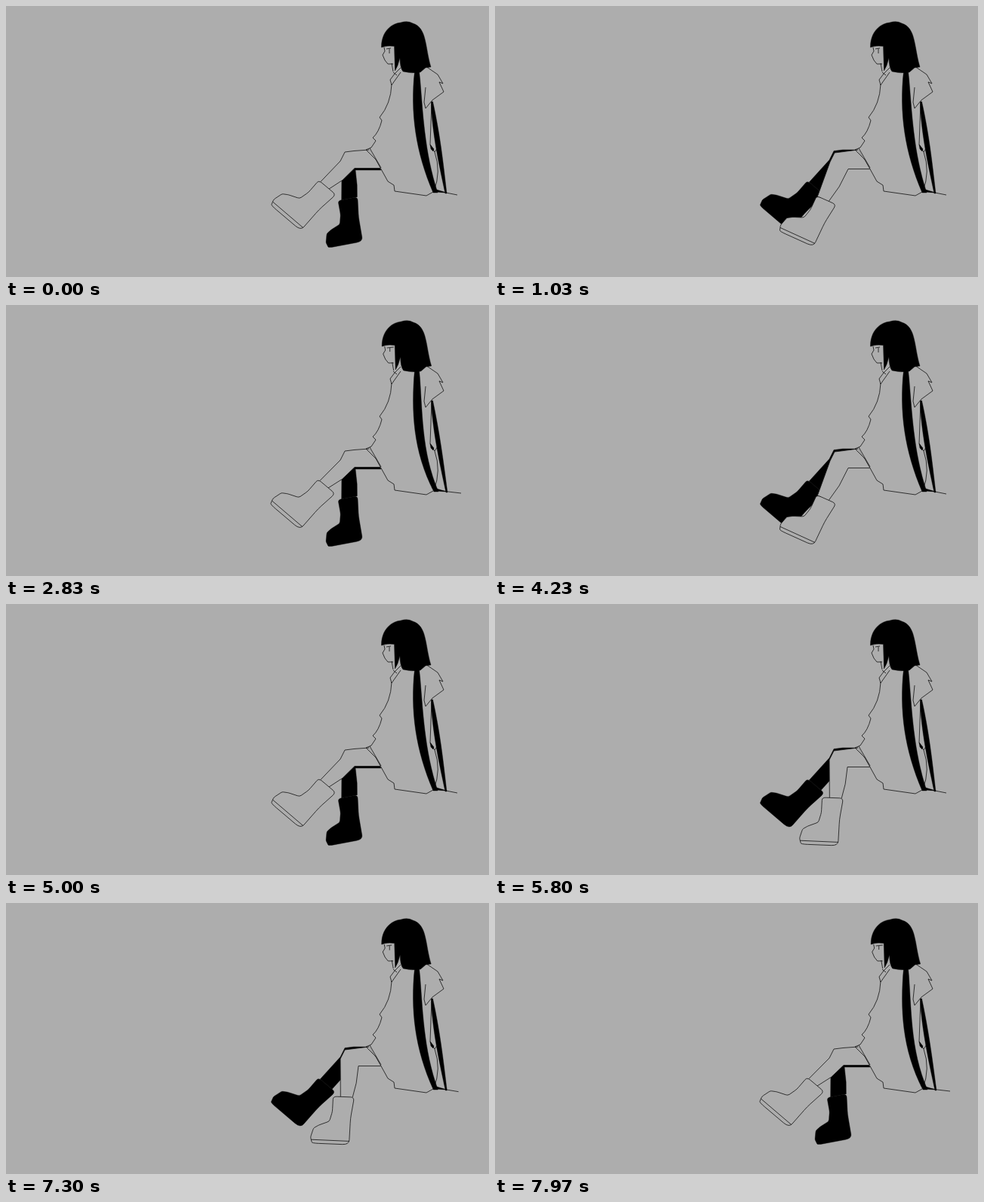
An HTML page for the animation above (8 s loop, 640 by 360 pixels).

```html
<!DOCTYPE html>
<html lang="en">
<head>
<meta charset="utf-8">
<title>Swinging legs</title>
<style>
html, body { margin: 0; width: 100%; height: 100%; overflow: hidden; background: #adadad; }
svg { display: block; width: 100vw; height: 100vh; }
path { stroke: #111; stroke-width: .8; stroke-linejoin: round; fill: none; }
.ink { fill: #000; stroke: #000; stroke-width: .4; }
.paper { fill: #adadad; }
.bare { stroke: none; }
</style>
</head>
<body>
<svg id="stage" viewBox="0 0 640 360">
  <path id="farLeg" class="ink"/>
  <path id="farBoot" class="ink"/>
  <path id="nearSkin" class="paper bare"/>
  <path id="nearShin"/>
  <path id="nearCalf"/>
  <path id="nearBoot" class="paper"/>
  <path id="nearSole"/>

  <!-- dress, collar, sleeve, arm -->
  <path class="paper bare" d="M522,86L511,104L498,152L481,191L515,246L557,252L566,247L556,86Z"/>
  <path d="M511,104Q510,130 495,148L498,152Q494,168 486,175L490,179L484,188L477,191L490,204L506,233L514,238L515,246L557,252L566,247"/>
  <path d="M482,189L497,215M523,82L515,90L509,98L511,105L523,88M513,88L518,92"/>
  <path d="M556,80L572,91L579,103L574,101L580,114L565,125L556,136L554,128L556,108"/>
  <path d="M564,128L562,184L568,194L572,188M568,194Q577,220 567,246"/>
  <path class="ink" d="M562,184L567,190L566,193L563,190Z"/>

  <path id="backLock" class="ink"/>
  <path id="sideLock" class="ink"/>
  <path id="ground"/>
  <path class="ink" d="M564,242L584,248L568,247Z"/>

  <g id="head">
    <path d="M501,55L502,60L499,65L502,72L506,77L513,77M511,76L513,87"/>
    <path class="ink" d="M497.5,55C497,39 506,24 523,22Q532,19 539,23C558,29 555,54 563,81L556,82L549,88Q537,90 526,87Q522,82 522,69L519,79L515.5,86L514.5,53.5Q505,52 497.5,55Z"/>
    <path id="eye" stroke-width="1.2"/>
  </g>
</svg>
<script>
const FPS = 30, FRAMES = 240;
const $ = id => document.getElementById(id);
const lerp = (a, b, k) => a + (b - a) * k;
const between = (p, q, k) => [lerp(p[0], q[0], k), lerp(p[1], q[1], k)];
const blend = (a, b, k) => Object.fromEntries(Object.keys(a).map(key => [key, lerp(a[key], b[key], k)]));
const ease = k => k * k * (3 - 2 * k);

const poly = (points, close = '') => 'M' + points.map(p => p.map(v => v.toFixed(2))).join('L') + close;
const put = (id, points, close) => $(id).setAttribute('d', poly(points, close));

// Closed outline whose corners are cut by short curves.
function rounded(points, k = 0.18) {
  const n = points.length;
  return points.map((p, i) => {
    const a = between(p, points[(i + n - 1) % n], k), b = between(p, points[(i + 1) % n], k);
    return `${i ? 'L' : 'M'}${a}Q${p} ${b}`;
  }).join('') + 'Z';
}

// Upright boot around the middle of its cuff: cuff, back, heel, toe, instep.
const BOOT = [[-14, -1], [14, 0], [9, 28], [7, 63], [-42, 61], [-44, 53], [-40, 41], [-33, 37], [-19, 32], [-15, 19]];

function boot({ x, y, turn, size }) {
  const c = Math.cos(turn * Math.PI / 180) * size, s = Math.sin(turn * Math.PI / 180) * size;
  return BOOT.map(([u, v]) => [x + u * c - v * s, y + u * s + v * c]);
}

// x, y, turn, size place the boot; inset and wide place the leg within its cuff.
const out = { x: 425.5, y: 241.5, turn: 38, size: 1.05, inset: .1, wide: .5, kneeX: 449, kneeY: 194, backX: 462, backY: 215.5 };
const crossing = { x: 439, y: 258.5, turn: 22, size: 1, inset: .04, wide: .58, kneeX: 450, kneeY: 195, backX: 468, backY: 216.5 };
const hanging = { x: 447.5, y: 258, turn: 0, size: 1, inset: .35, wide: .57, kneeX: 449, kneeY: 195, backX: 467, backY: 216.5 };
const farOut = { ...out, x: 425, y: 242, wide: .7, kneeY: 192.5, backX: 458, backY: 212 };
const farHanging = { x: 453, y: 256.5, turn: -13, size: .94, inset: .18, wide: .8, kneeX: 451, kneeY: 203, backX: 463, backY: 218 };

function leg(p) {
  const [front, rear] = boot(p);
  const shin = between(front, rear, p.inset), calf = between(front, rear, p.inset + p.wide);
  const knee = [p.kneeX, p.kneeY], back = [p.backX, p.backY];
  const below = [p.kneeX - 6, p.kneeY + 12];
  const bulge = between(calf, back, .5);
  return {
    shin: [[481, 191], [p.kneeX + 12, p.kneeY - 1.5], knee, below, shin],
    calf: [calf, [bulge[0] + 1, bulge[1] + 2], back, [497, p.backY]]
  };
}

// A lock of hair that bends to the right and narrows at both ends.
function lock(x, top, bottom, reach, bend, thin, thick) {
  const left = [], right = [];
  for (let i = 0; i <= 16; i++) {
    const u = i / 16, y = lerp(top, bottom, u);
    const mid = x + reach * u ** bend, half = thin + thick * Math.sin(Math.PI * u ** .8);
    left.push([mid - half, y]);
    right.unshift([mid + half, y]);
  }
  return [...left, ...right];
}

// Frames at which the legs cross; odd swings bring the near leg back out.
const BEATS = [5, 31, 58, 81, 106, 127, 161, 183, 210, 235];
const LAND = 4, SETTLE = 12;

// swing: 0 = near leg out, 1 = crossing, 2 = far leg out
function motion(frame) {
  const i = BEATS.findLastIndex(b => b <= frame);
  if (i < 0) return { swing: 0, sway: 0 };
  const age = frame - BEATS[i], goal = i % 2 ? 0 : 2;
  const arrive = Math.max(0, Math.min(1, (age - 1) / (LAND - 1)));
  const calm = Math.max(0, Math.min(1, (age - LAND) / (SETTLE - LAND)));
  return { swing: lerp(1, goal, arrive), sway: arrive * (1 - ease(calm)) };
}

function draw(frame) {
  const { swing, sway } = motion(frame);
  const near = swing < 1 ? blend(out, crossing, swing) : blend(crossing, hanging, swing - 1);
  const far = blend(farHanging, farOut, Math.min(1, swing));
  if (swing < 1) near.x -= sway;

  const farLeg = leg(far), nearLeg = leg(near), shoe = boot(near);
  put('farLeg', [...farLeg.shin, ...farLeg.calf], 'Z');
  $('farBoot').setAttribute('d', rounded(boot(far)));
  put('nearSkin', [...nearLeg.shin, ...nearLeg.calf], 'Z');
  put('nearShin', nearLeg.shin);
  put('nearCalf', nearLeg.calf);
  $('nearBoot').setAttribute('d', rounded(shoe));
  put('nearSole', [between(shoe[4], shoe[5], .6), between(shoe[3], shoe[2], .13)]);

  put('backLock', lock(544.5, 87, 248, 24.5 + sway, 2.5 + sway * .5, 3, 3.2 - sway * .5), 'Z');
  put('sideLock', lock(564.5, 127, 249, 18.5 + sway, 1.1, 1, 2.4 - sway * .4), 'Z');
  put('ground', [[566, 245], [583 + 3 * sway, 248], [598 + 5 * sway, 251 - sway]]);
  $('head').setAttribute('transform', `translate(${sway * .7},0)`);
  $('eye').setAttribute('d', `M504,57L${510 + 3 * sway},56M508,57V${63 - sway}`);
}

const began = performance.now();
function tick() {
  const t = performance.now() - began;
  draw(Math.floor((t + 5) * FPS / 1000) % FRAMES);
  requestAnimationFrame(tick);
}
tick();
</script>
</body>
</html>
```
